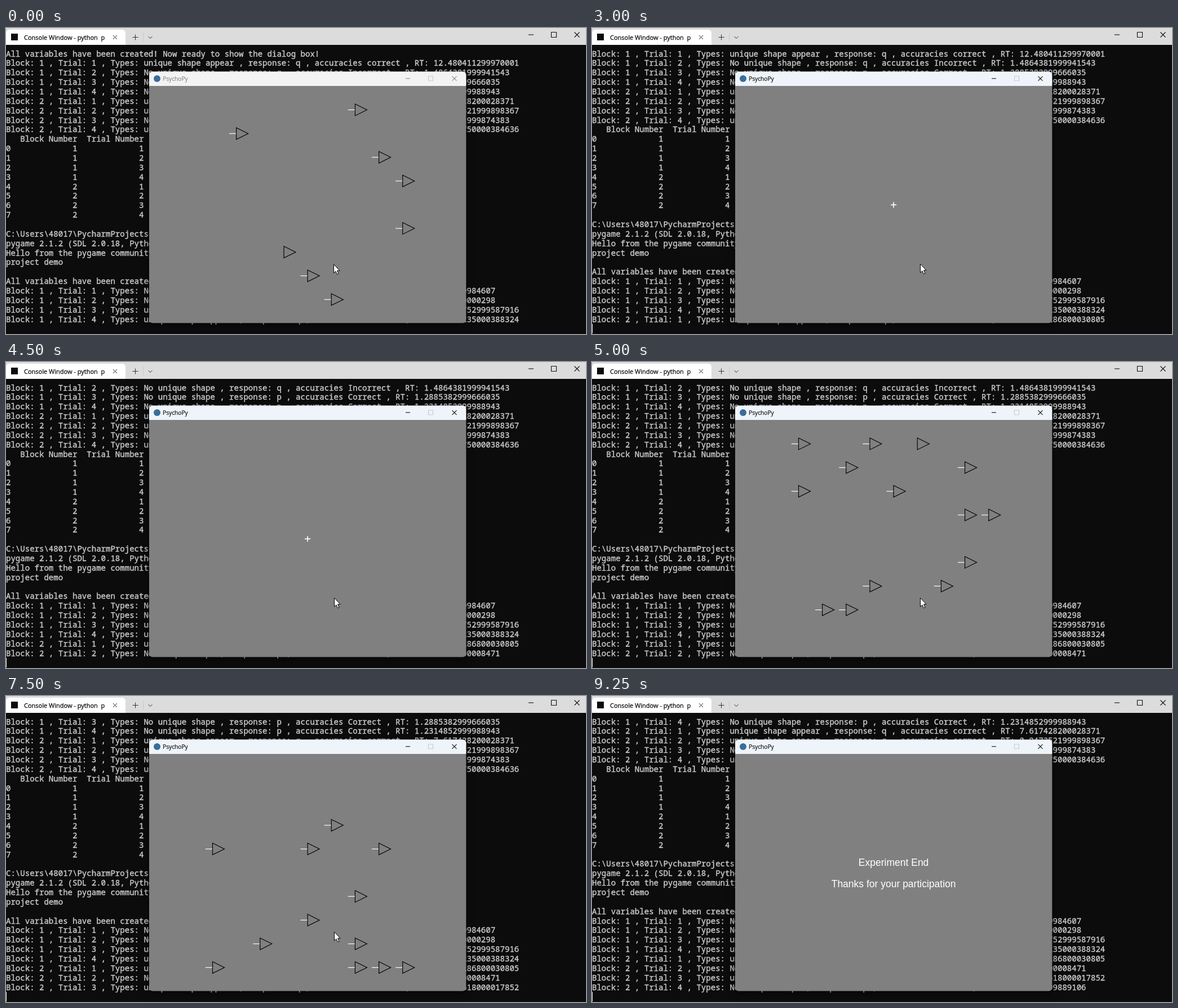
Write an HTML page with a canvas that moves like this. It is 1029x544 px and loops after 9500 ms.

```html
<!DOCTYPE html>
<html lang="en">
<head>
<meta charset="utf-8">
<style>
  html, body { margin: 0; width: 100%; height: 100%; overflow: hidden; background: #0c0c0c; }
  canvas { display: block; }
</style>
</head>
<body>
<canvas id="stage" width="1029" height="544"></canvas>
<script>
const ctx = document.getElementById('stage').getContext('2d');
const LOOP = 9500;
const GRID = 42.15;
const CENTER = { x: 535.1, y: 314.1 };

const trial = (block, number, unique, key, result, rt) =>
  `Block: ${block} , Trial: ${number} , Types: ${unique ? 'unique shape appear' : 'No unique shape'}` +
  ` , response: ${key} , accuracies ${result} , RT: ${rt}`;
const found = (block, number, rt) => trial(block, number, true, 'q', 'correct', rt);
const absent = (block, number, rt) => trial(block, number, false, 'p', 'Correct', rt);
const missed = (block, number, rt) => trial(block, number, false, 'q', 'Incorrect', rt);

const READY = 'All variables have been created! Now ready to show the dialog box!';
const tableRow = i => `${i}`.padEnd(14) + `${i < 4 ? 1 : 2}`.padEnd(14) + (i % 4 + 1);

const consoleLines = [
  READY,
  found(1, 1, '12.480411299970001'),
  missed(1, 2, '1.4864381999941543'),
  absent(1, 3, '1.2885382999666035'),
  absent(1, 4, '1.2314852999988943'),
  found(2, 1, '7.617428200028371'),
  found(2, 2, '0.9473521999898367'),
  missed(2, 3, '1.1052641999874383'),
  found(2, 4, '1.0362750000384636'),
  '   Block Number  Trial Number',
  ...Array.from({ length: 8 }, (_, i) => tableRow(i)),
  '',
  'C:\\Users\\48017\\PycharmProjects\\',
  'pygame 2.1.2 (SDL 2.0.18, Python',
  'Hello from the pygame community.',
  'project demo',
  '',
  READY,
  absent(1, 1, '1.724639999984607'),
  absent(1, 2, '1.315820000000298'),
  found(1, 3, '1.0428752999587916'),
  found(1, 4, '0.9164235000388324'),
  found(2, 1, '1.1835286800030805'),
  absent(2, 2, '1.4520630000008471'),
  found(2, 3, '0.9371618000017852'),
  absent(2, 4, '1.2706481999889106')
];

// Nine columns by nine rows: ">" has a tail, "^" has none.
const layouts = {
  first: ['......>..', '.>.......', '.......>.', '........>', '', '........>', '...^.....', '....>....', '.....>...'],
  second: ['...>.....', '', '.>.......', '......>.>', '', '......>..', '', '>........', '..>.....>'],
  third: ['>..>.^...', '..>....>.', '>...>....', '.......>>', '', '.......>.', '...>..>..', '.>>......', ''],
  fourth: ['', '', '.....>...', '>...>..>.', '', '......>..', '....>....', '..>...>..', '>.....>>>']
};

const scenes = [
  { from: 0, scroll: 0, show: 'first' },
  { from: 3000, scroll: 1, show: 'cross' },
  { from: 3500, scroll: 1, show: 'second' },
  { from: 4500, scroll: 2, show: 'cross' },
  { from: 5000, scroll: 2, show: 'third' },
  { from: 6250, scroll: 3, show: 'cross' },
  { from: 6750, scroll: 3, show: 'fourth' },
  { from: 8000, scroll: 4, show: 'end' }
];

function rect(x, y, w, h, color) {
  ctx.fillStyle = color;
  ctx.fillRect(x, y, w, h);
}

function roundRect(x, y, w, h, radii, color) {
  ctx.fillStyle = color;
  ctx.beginPath();
  ctx.roundRect(x, y, w, h, radii);
  ctx.fill();
}

// "embolden" thickens the glyphs by a hairline outline.
function text(string, x, y, font, color, { align = 'left', embolden = 0 } = {}) {
  ctx.font = font;
  ctx.fillStyle = ctx.strokeStyle = color;
  ctx.textAlign = align;
  ctx.fillText(string, x, y);
  if (!embolden) return;
  ctx.lineWidth = embolden;
  ctx.lineJoin = 'round';
  ctx.strokeText(string, x, y);
  ctx.lineJoin = 'miter';
}

function stroke(path, color, width = 1, x = 0, y = 0) {
  ctx.save();
  ctx.translate(x, y);
  ctx.strokeStyle = color;
  ctx.lineWidth = width;
  ctx.stroke(new Path2D(path));
  ctx.restore();
}

function windowButtons(xs, y, size, colors) {
  const r = size / 2;
  stroke(`M${-r} 0H${r}`, colors[0], 1.1, xs[0], y);
  stroke(`M${-r} ${-r}H${r}V${r}H${-r}Z`, colors[1], 1.1, xs[1], y);
  stroke(`M${-r} ${-r}L${r} ${r}M${r} ${-r}L${-r} ${r}`, colors[2], 1.1, xs[2], y);
}

function drawConsole(scroll) {
  rect(0, 0, 1029, 544, '#0c0c0c');
  rect(0, 0, 1029, 30, '#dcdcdc');
  roundRect(0, 3, 212, 27, [6, 6, 0, 0], '#ffffff');
  rect(9, 10, 12, 12, '#0c0c0c');
  ctx.save();
  ctx.beginPath();
  ctx.rect(30, 4, 145.5, 26);
  ctx.clip();
  text('Console Window - python  project', 32, 20.5, '11px "Open Sans", sans-serif', '#111', { embolden: .3 });
  ctx.restore();
  stroke('M-3.5 -3.5L3.5 3.5M3.5 -3.5L-3.5 3.5', '#222', 1, 193.5, 16.5);
  stroke('M-5 0H5M0 -5V5', '#333', 1, 229.5, 16.5);
  stroke('M243.5 8V24', '#cacaca');
  stroke('M-3.5 -1.5L0 2L3.5 -1.5', '#333', 1, 256, 16.5);
  windowButtons([931.5, 972, 1013], 12, 9, ['#111', '#111', '#111']);

  consoleLines.slice(scroll, scroll + 29).forEach((line, i) =>
    text(line, 0, 50.6 + i * 16.857, '14.05px "Noto Sans Mono", monospace', '#cccccc', { embolden: .4 }));
  if (scroll) rect(0, 526, 1, 17, '#ffffff');
}

function drawWindowFrame(active) {
  ctx.save();
  ctx.shadowColor = 'rgba(0,0,0,.55)';
  ctx.shadowBlur = 14;
  ctx.shadowOffsetY = 3;
  roundRect(254, 77.5, 562.3, 447, 6, '#808080');
  ctx.restore();
  roundRect(254, 77.5, 562.3, 25.5, [6, 6, 0, 0], active ? '#eef4f9' : '#f3f3f3');
  roundRect(262, 84, 12, 12, 6, '#3a6d9c');
  const ink = active ? '#111' : '#8c8c8c';
  text('PsychoPy', 278, 94, '10.2px "Open Sans", sans-serif', ink, { embolden: .2 });
  windowButtons([713, 753.5, 795.5], 89.8, 8, [ink, '#c6cacd', ink]);
}

function drawShapes(rows) {
  rows.forEach((row, r) => [...row].forEach((mark, c) => {
    if (mark === '.') return;
    const x = CENTER.x + (c - 4) * GRID;
    const y = CENTER.y + (r - 4) * GRID;
    if (mark === '>') stroke('M-12.6 0H0', '#ffffff', 1.15, x, y);
    stroke('M0 -10.4L21 0L0 10.4Z', '#000000', 1.15, x, y);
  }));
}

function drawContent(show) {
  if (show === 'cross') {
    stroke('M-5 0H5M0 -5V5', '#ffffff', 1.6, CENTER.x, CENTER.y + .3);
  } else if (show === 'end') {
    const font = '17.5px "Liberation Sans", Arial, sans-serif';
    text('Experiment End', CENTER.x, 301.8, font, '#ffffff', { align: 'center' });
    text('Thanks for your participation', CENTER.x, 339.8, font, '#ffffff', { align: 'center' });
  } else {
    drawShapes(layouts[show]);
  }
}

function drawPointer(t) {
  if (t >= 9250) return;
  const [x, y] = t < 2750 ? [581.5, 420.2] : t < 9000 ? [582.5, 419.6] : [560.5, 489];
  const arrow = 'M0 0V15.4L3.4 12.2L6 17.8L8.5 16.7L6 11.2H10.6Z';
  ctx.save();
  ctx.translate(x, y);
  ctx.fillStyle = '#ffffff';
  ctx.fill(new Path2D(arrow));
  ctx.restore();
  stroke(arrow, '#000000', 1, x, y);
}

function frame() {
  const t = performance.now() % LOOP;
  const scene = scenes.findLast(s => s.from <= t);
  drawConsole(scene.scroll);
  drawWindowFrame(t >= 2750);
  drawContent(scene.show);
  drawPointer(t);
  requestAnimationFrame(frame);
}
frame();
</script>
</body>
</html>
```
